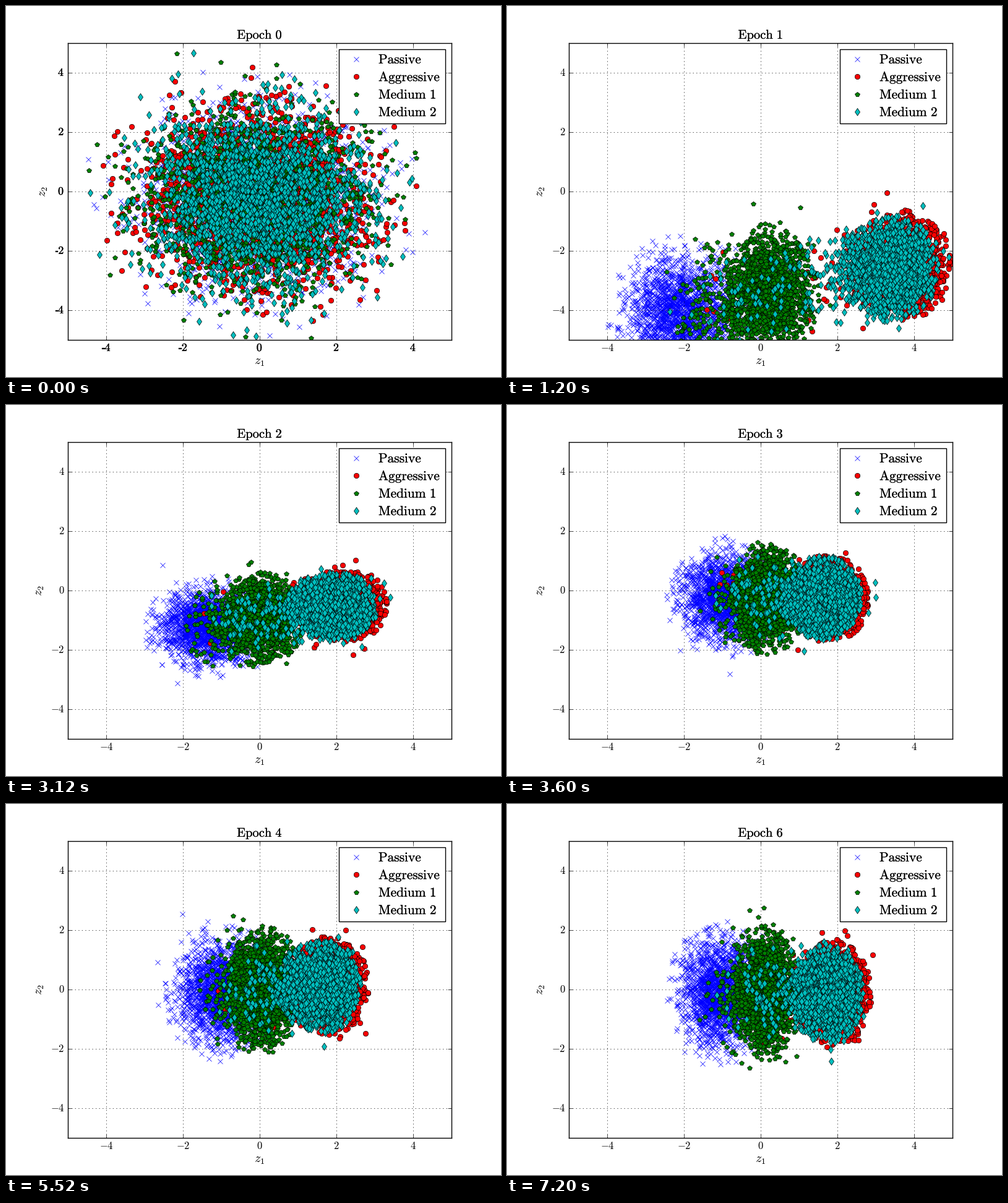
These frames come from a looping animation (800 by 600 pixels, 8000 ms). A matplotlib script:

```python
import numpy as np
import matplotlib.pyplot as plt
from matplotlib.animation import FuncAnimation
from matplotlib.patches import Rectangle
from matplotlib.patheffects import withStroke

plt.rcParams.update({
    "mathtext.fontset": "cm",
    "font.family": "Liberation Serif",
    "lines.scale_dashes": False,
    "lines.dotted_pattern": [1, 3],
    "axes.axisbelow": False,
    "axes.linewidth": 1.0,
})

N = 1900
STYLES = {"Passive": ("x", "#0000ff"), "Aggressive": ("o", "#ff0000"),
          r"Medium\ 1": ("p", "#008000"), r"Medium\ 2": ("d", "#00bfbf")}

# Per class: place between left and right group, width, height,
# cut-off in sigmas, share of points spilling to the left
SHAPES = {"Passive": (0, 0.55, 1.0, 2.9, 0),
          "Aggressive": (1.06, 0.43, 0.85, 2.4, 0.04),
          r"Medium\ 1": (0.43, 0.42, 1.1, 2.4, 0.2),
          r"Medium\ 2": (1, 0.43, 0.85, 2.3, 0.09)}

# Per epoch: left group x, gap to right group, y at x = 0, slope, width, height
EPOCHS = [(-2.1, 5.5, -3.5, 0.27, 1.25, 0.92),
          (-1.4, 3.4, -0.95, 0.2, 1.1, 0.6),
          (-0.9, 2.55, -0.25, 0, 1.0, 0.72),
          (-1.0, 2.65, 0, 0.08, 1.0, 0.82),
          (-1.4, 2.95, 0.05, 0, 0.9, 0.93),
          (-1.05, 2.85, -0.1, 0, 0.88, 0.88)]

rng = np.random.default_rng(12)


def disc(n, clip):
    """Normal points cut off at `clip` sigmas, a few pushed further out."""
    u = rng.random(n) * (1 - np.exp(-clip ** 2 / 2))
    r = np.sqrt(-2 * np.log(1 - u))
    r *= np.where(rng.random(n) < 0.02, 1.4, 1)
    a = rng.uniform(0, 2 * np.pi, n)
    return r * np.cos(a), r * np.sin(a)


def cloud(name, epoch):
    if epoch == 0:
        dx, dy = disc(N, 3.3)
        return -0.08 + 1.38 * dx, -0.25 + 1.43 * dy
    left, gap, level, slope, wide, tall = EPOCHS[epoch - 1]
    place, sx, sy, clip, spill = SHAPES[name]
    dx, dy = disc(N, clip)
    if place > 0.5:
        dx = np.where(dx < 0, 1.25 * dx, dx)  # softer on the left side
    drift = rng.uniform(0, 0.8 * place * gap, N) * (rng.random(N) < spill)
    cx = left + place * gap - drift
    return cx + wide * sx * dx, level + slope * cx + tall * sy * dy


clouds = [{name: cloud(name, e) for name in STYLES}
          for e in range(len(EPOCHS) + 1)]

fig = plt.figure(figsize=(8, 6), dpi=100, facecolor="white")
ax = fig.add_axes([0.125, 0.1, 0.775, 0.8])
ax.set(xlim=(-5, 5), ylim=(-5, 5))
ticks = range(-4, 5, 2)
ax.set_xticks(ticks)
ax.set_yticks(ticks)
ax.tick_params(direction="in", length=4, width=0.5, top=True, right=True,
               labelbottom=False, labelleft=False)
ax.grid(color="black", linestyle=":", linewidth=0.5)

# Overlay in stage pixels for text and legend
page = fig.add_axes([0, 0, 1, 1])
page.set(xlim=(0, 800), ylim=(600, 0))
page.axis("off")


def text(x, y, s, size, ha="center", bold=0.0, **kw):
    t = page.text(x, y, s, fontsize=size, ha=ha, va="baseline", **kw)
    if bold:
        t.set_path_effects([withStroke(linewidth=bold, foreground="black")])
    return t


def markers(axes, name, x, y):
    shape, color = STYLES[name]
    edge = color if shape == "x" else "black"
    return axes.plot(x, y, ls="none", marker=shape, ms=6, mfc=color,
                     mec=edge, mew=0.5)[0]


series = {name: markers(ax, name, [], []) for name in STYLES}

page.add_patch(Rectangle((538, 70), 172, 120, fc="white", ec="black", lw=1))
for row, name in enumerate(STYLES):
    y = 86 + 28.4 * row
    markers(page, name, [566], [y])
    text(602, y + 7, rf"$\mathrm{{{name}}}$", 15.4, ha="left", bold=0.12)

title = text(410, 53, "", 14.8, bold=0.12)
text(410, 580, "$z_1$", 14.4)
ylabel = text(58.5, 300, "$z_2$", 14.4, rotation=90, rotation_mode="anchor")

# The first epoch has hyphens in its tick labels, the others minus signs
plain, signed = [], []
for v in ticks:
    px, py = 410 + 62 * v, 300 - 48 * v
    digit = rf"$\mathrm{{{abs(v)}}}$"
    shift = 2.8 if v < 0 else 0
    plain.append(text(px + shift, 558, digit, 13, bold=0.2))
    plain.append(text(94.4, py + 5, digit, 13, ha="right", bold=0.2))
    if v < 0:
        plain.append(text(px - 4.6, 558, "-", 12, bold=0.2))
        plain.append(text(82.3, py + 5, "-", 12, bold=0.2))
    signed.append(text(px, 558.5, f"${v}$", 12))
    signed.append(text(94.4, py + 5, f"${v}$", 12, ha="right"))


def draw(i):
    epoch = i // 3
    title.set_text(rf"$\mathrm{{Epoch\ {epoch}}}$")
    ylabel.set_x(65 if epoch == 0 else 58.5)
    for t in plain:
        t.set_visible(epoch == 0)
    for t in signed:
        t.set_visible(epoch > 0)
    for name, line in series.items():
        line.set_data(*clouds[epoch][name])
    return []


anim = FuncAnimation(fig, draw, frames=20, interval=400,
                     init_func=lambda: draw(0), repeat=True, repeat_delay=0,
                     blit=False)
plt.show()
```
